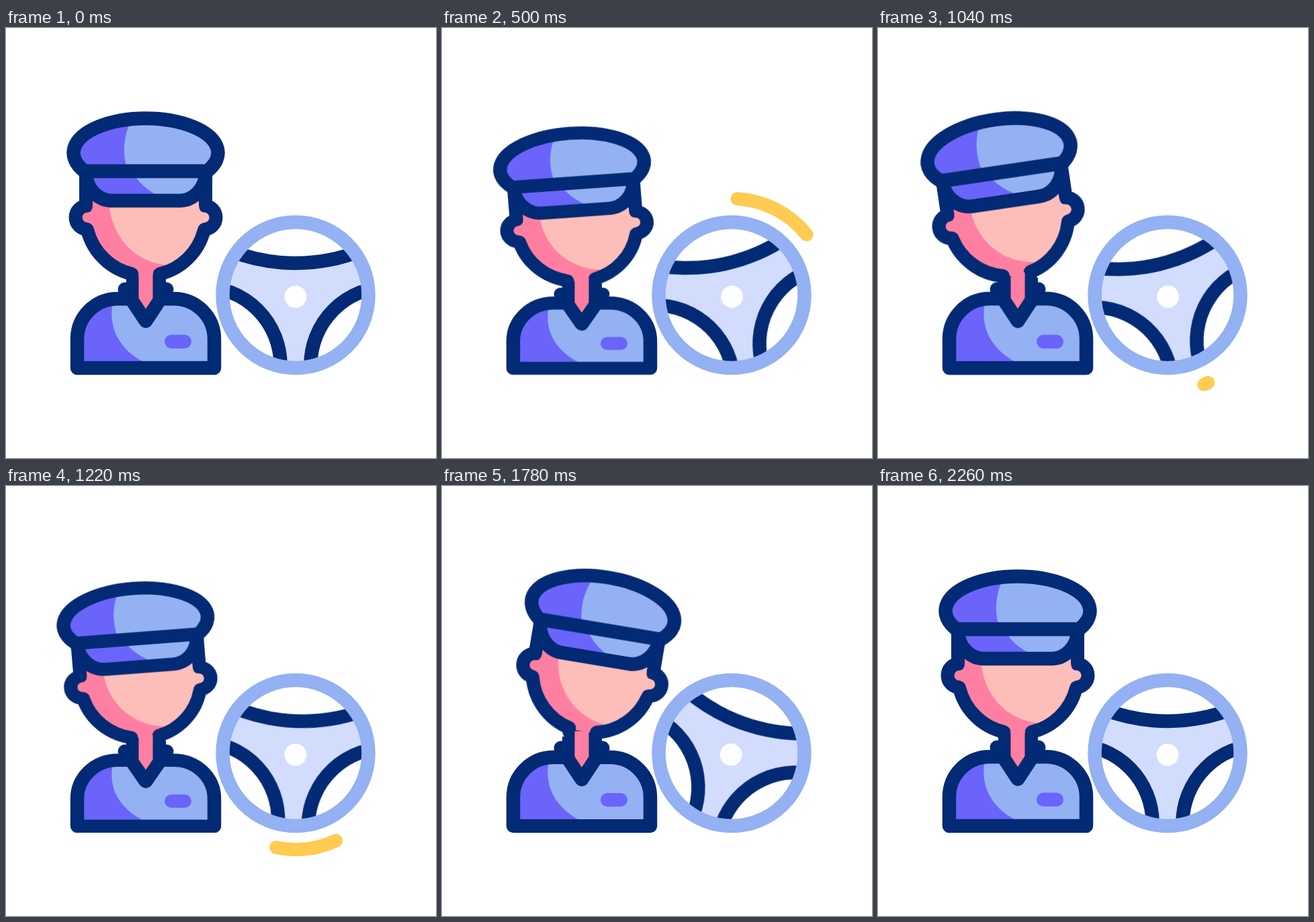
Recreate the animation shown at these times as an HTML page without scripts. Size 640 by 640 pixels, loop 2400 ms.

```html
<!DOCTYPE html>
<html lang="en">
<head>
<meta charset="utf-8">
<title>Driver and steering wheel</title>
<style>
  @property --head { syntax: "<length>"; inherits: false; initial-value: 0px; }
  @property --tail { syntax: "<length>"; inherits: false; initial-value: 0px; }

  html, body { margin: 0; width: 100%; height: 100%; overflow: hidden; background: #fff; }
  svg { display: block; width: 100%; height: 100%; }

  .navy { fill: #032a74; }
  .violet { fill: #6a64fa; }
  .sky { fill: #93b1f3; }
  .pink { fill: #ff7fa2; }
  .peach { fill: #fdbeb9; }
  .pale { fill: #d2dcfd; }
  .white { fill: #fff; }
  .line { stroke: #032a74; stroke-width: 20.5; stroke-linejoin: round; stroke-linecap: round; }
  .hollow { fill: none; }

  .man, .skull, .spokes, .swoosh {
    animation: 2400ms cubic-bezier(.333, 0, .667, 1) infinite;
    transform-box: view-box;
  }
  .man { transform-origin: 208px 516px; animation-name: squash; }
  .skull { transform-origin: 208px 377px; animation-name: tilt; }
  .spokes { transform-origin: 431px 397.5px; animation-name: steer; }

  @keyframes squash {
    0%, 8.333% { transform: scaleY(1); }
    25% { transform: scaleY(.933); }
    41.667% { transform: scaleY(1.004); }
    58.333% { transform: scaleY(.919); }
    75% { transform: scaleY(.994); }
    93.75%, 100% { transform: scaleY(1); }
  }
  @keyframes tilt {
    0%, 8.333% { transform: translateY(0) rotate(0deg); }
    25% { transform: translateY(0) rotate(-5.1deg); }
    41.667% { transform: translateY(0) rotate(-8.6deg); }
    58.333% { transform: translateY(0) rotate(-1.6deg); }
    75% { transform: translateY(-4px) rotate(9.6deg); }
    93.75%, 100% { transform: translateY(0) rotate(0deg); }
  }
  @keyframes steer {
    0%, 8.333% { transform: rotate(0deg); }
    33.333% { transform: rotate(-24.5deg); }
    66.667% { transform: rotate(24.5deg); }
    93.75%, 100% { transform: rotate(0deg); }
  }

  /* each swoosh is a trimmed arc: its head runs ahead of its tail */
  .swoosh {
    fill: none; stroke: #ffcb50; stroke-width: 20; stroke-linecap: round;
    stroke-dasharray: calc(var(--head) - var(--tail)) 999px;
    stroke-dashoffset: calc(-1 * var(--tail));
    opacity: 0;
  }
  .upper { animation-name: head-up, tail-up, show-up; }
  .lower { animation-name: head-low, tail-low, show-low; }

  @keyframes head-up { 0%, 8.333% { --head: 0px; } 24.375%, 100% { --head: 100px; } }
  @keyframes tail-up { 0%, 17.917% { --tail: 0px; } 33.333%, 100% { --tail: 100px; } }
  @keyframes head-low { 0%, 41.25% { --head: 0px; } 58.333%, 100% { --head: 100px; } }
  @keyframes tail-low { 0%, 51.667% { --tail: 0px; } 67.5%, 100% { --tail: 100px; } }
  @keyframes show-up {
    0% { opacity: 0; animation-timing-function: step-end; }
    9% { opacity: 1; animation-timing-function: step-end; }
    33%, 100% { opacity: 0; }
  }
  @keyframes show-low {
    0% { opacity: 0; animation-timing-function: step-end; }
    41.6% { opacity: 1; animation-timing-function: step-end; }
    67%, 100% { opacity: 0; }
  }
</style>
</head>
<body>
<svg viewBox="0 0 640 640">
  <defs>
    <path id="face" d="M129 215 V264 Q129 274 121 274.5 A7.5 7.5 0 0 0 121 289.5 Q129.5 291 131 299
      A79.5 79.5 0 0 0 190 356.5 Q197.5 359 197.5 368 H218.5 Q218.5 359 226 356.5
      A79.5 79.5 0 0 0 285 299 Q286.5 291 295 289.5 A7.5 7.5 0 0 0 295 274.5 Q287 274 287 264 V215 Z"/>
    <path id="crown" d="M116.5 213 A107.5 51.5 0 1 1 299.5 213 Z"/>
    <path id="visor" d="M118.5 213 C118.5 240 138 257 158 257 H258 C278 257 297.5 240 297.5 213 Z"/>
    <path id="shirt" d="M106 506 V463 A60 60 0 0 1 166 403 H250 A60 60 0 0 1 310 463 V506 Z"/>
    <clipPath id="in-face"><use href="#face"/></clipPath>
    <clipPath id="in-shirt"><use href="#shirt"/></clipPath>
    <clipPath id="in-rim"><circle cx="431" cy="397.5" r="102"/></clipPath>
  </defs>

  <g class="man">
    <g class="skull">
      <use href="#face" class="line" style="stroke-width:40"/>
      <use href="#face" class="pink"/>
      <path class="peach" clip-path="url(#in-face)" d="M154 255 C152 300 185 350 243 353 H320 V255 Z"/>
      <use href="#visor" class="violet"/>
      <path class="sky" d="M188 213 Q200 238 232 252 L258 257 C278 257 297.5 240 297.5 213 Z"/>
      <use href="#visor" class="line hollow"/>
      <use href="#crown" class="violet"/>
      <path class="sky" d="M188 134 Q168 172 181 213 H299.5 A107.5 51.5 0 0 0 208 134.5 Z"/>
      <use href="#crown" class="line hollow"/>
    </g>
    <use href="#shirt" class="violet"/>
    <path class="sky" clip-path="url(#in-shirt)" d="M160 403 C150 445 168 478 206 498 H310 V403 Z"/>
    <use href="#shirt" class="line hollow"/>
    <rect class="violet" x="236" y="456.5" width="40" height="20.5" rx="10.25"/>
    <path class="navy" d="M179 372 H238 V392 L208 432 L179 392 Z"/>
    <path class="line hollow" style="stroke-width:21" d="M177 389 L208 436 L239 389"/>
    <path class="pink" d="M197.5 364 V402 L208 418 L218.5 402 V364 Z"/>
  </g>

  <g clip-path="url(#in-rim)">
    <g class="spokes">
      <circle class="pale" cx="431" cy="397.5" r="104"/>
      <circle class="line white" cx="431" cy="84" r="266"/>
      <circle class="line white" cx="292" cy="502" r="116.6"/>
      <circle class="line white" cx="570" cy="502" r="116.6"/>
      <circle class="white" cx="431" cy="400" r="16.5"/>
    </g>
  </g>
  <circle class="hollow" cx="431" cy="397.5" r="108.5" stroke="#93b1f3" stroke-width="20.5"/>

  <path class="swoosh upper" pathLength="100" d="M551.35 319.34 A143.5 143.5 0 0 0 421 254.35"/>
  <path class="swoosh lower" pathLength="100" d="M491.2 527.8 A143.5 143.5 0 0 1 345.6 512.85"/>
</svg>
</body>
</html>
```
